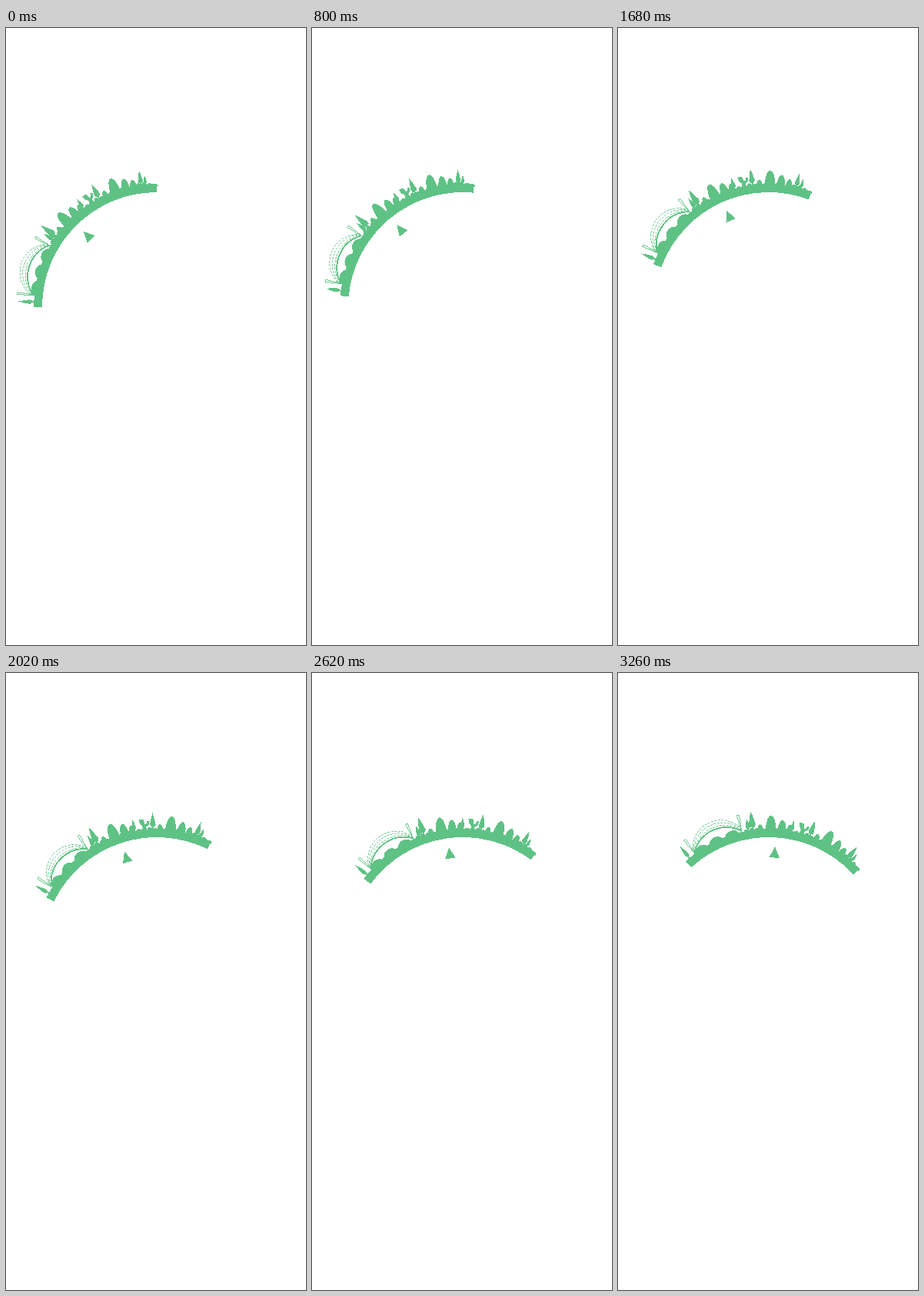
An HTML page that plays this animation: 390x800 px, repeating every 8000 ms.

```html
<!DOCTYPE html>
<html>
<head>
<meta charset="utf-8">
<style>
html, body { margin: 0; height: 100%; overflow: hidden; background: #fff }
svg { display: block }
</style>
</head>
<body>
<svg width="390" height="800" shape-rendering="crispEdges">
  <g transform="translate(196 362)"><g id="world" fill="#5fc285" stroke="#5fc285" stroke-width="0"></g></g>
</svg>
<script>
const world = document.getElementById('world');
const R = 160;

// Place a path upright on the rim, at an angle clockwise from the top.
function put(angle, d, attrs = {}) {
  const p = document.createElementNS('http://www.w3.org/2000/svg', 'path');
  const all = { d, transform: `rotate(${angle}) translate(0 ${-R})`, ...attrs };
  for (const k in all) p.setAttribute(k, all[k]);
  world.append(p);
}
const line = (angle, d, width, dash = 'none') =>
  put(angle, d, { fill: 'none', 'stroke-width': width, 'stroke-dasharray': dash });

// h is the height above the rim, w half the width.
function hill(angle, h, w = 2.3 + h * .28) {
  const c = -(h + .75) / .75;
  put(angle, `M${-w} 3C${-w * .85} ${c} ${w * .85} ${c} ${w} 3Z`);
}
function cypress(angle, h, w = h * .18) {
  const low = -h * .13, mid = -h * .28, high = -h * .65;
  put(angle, `M0 ${-h}L${w * .55} ${high}L${w} ${mid}L${w * .7} ${low}H1V2H-1V${low}` +
    `H${-w * .7}L${-w} ${mid}L${-w * .55} ${high}Z`);
}
// A tall cypress with a small one on the given side.
function pair(angle, h, side) {
  cypress(angle, h);
  cypress(angle + 2.1 * side, h * .64);
}
// An arc between two feet, rising from foot to top.
function arch(angle, foot, top, width, dash) {
  const half = 33.5, rise = top - foot, r = (half ** 2 + rise ** 2) / (2 * rise);
  line(angle, `M${-half} ${-foot}A${r} ${r} 0 0 1 ${half} ${-foot}`, width, dash);
}

// Ground band and the pointer inside it
put(0, `M0 0A${R} ${R} 0 0 0 ${-R} ${R}H-149A149 149 0 0 1 0 11Z`);
put(-44.1, 'M0 23.2L6.8 37.3H-6.8Z');

// Arch bridge with a pylon at each end
const bridge = -72.3;
arch(bridge, -2, 14, 1.8);
for (let i = 0; i < 3; i++) arch(bridge, i * 1.5, 17 + i * 4, .8, '3 1.5');
for (const side of [-1, 1]) line(bridge + side * 12.1, 'M0 1L-1.5 -22H1.5L0 1', .9);

// Mounds under the bridge, then low growth along the rest of the rim
for (let a = -81; a < -60; a += 8) hill(a, 5, 10);
for (let a = -58; a < 0; a += 2.6) hill(a, 1.8 + 1.3 * Math.sin(a * 1.9), 4);

// Two ranges of the same outline: a bump, a peak and two falling shoulders
for (const a of [-46.5, -19.8]) {
  hill(a - 4.9, 6);
  hill(a, 17.3);
  hill(a + 5.1, 12.2);
  hill(a + 8.8, 8);
}

cypress(-87.6, 20, 2.7);
pair(-54.9, 24.5, -1);
cypress(-36.6, 14.5);
cypress(-28, 21);
pair(-7.4, 18.5, 1);

// Forked tree
put(-32.4, 'M-5 -13L1 -13L2.5 -7L5 -7L6 -11L9 -10L8 -6L4 -3L3 2H-1L-1 -4L-4 -8Z');

const START = 500, STEP = 20, STEPS = 139, LOOP = 8000;
const TURN = 360 / 21000 * STEP;
function draw(now) {
  const t = now % LOOP;
  const n = Math.min(STEPS, Math.floor((t - START) / STEP) + 1);
  world.setAttribute('transform', `rotate(${Math.max(0, n - .5) * TURN})`);
  requestAnimationFrame(draw);
}
draw(performance.now());
</script>
</body>
</html>
```
